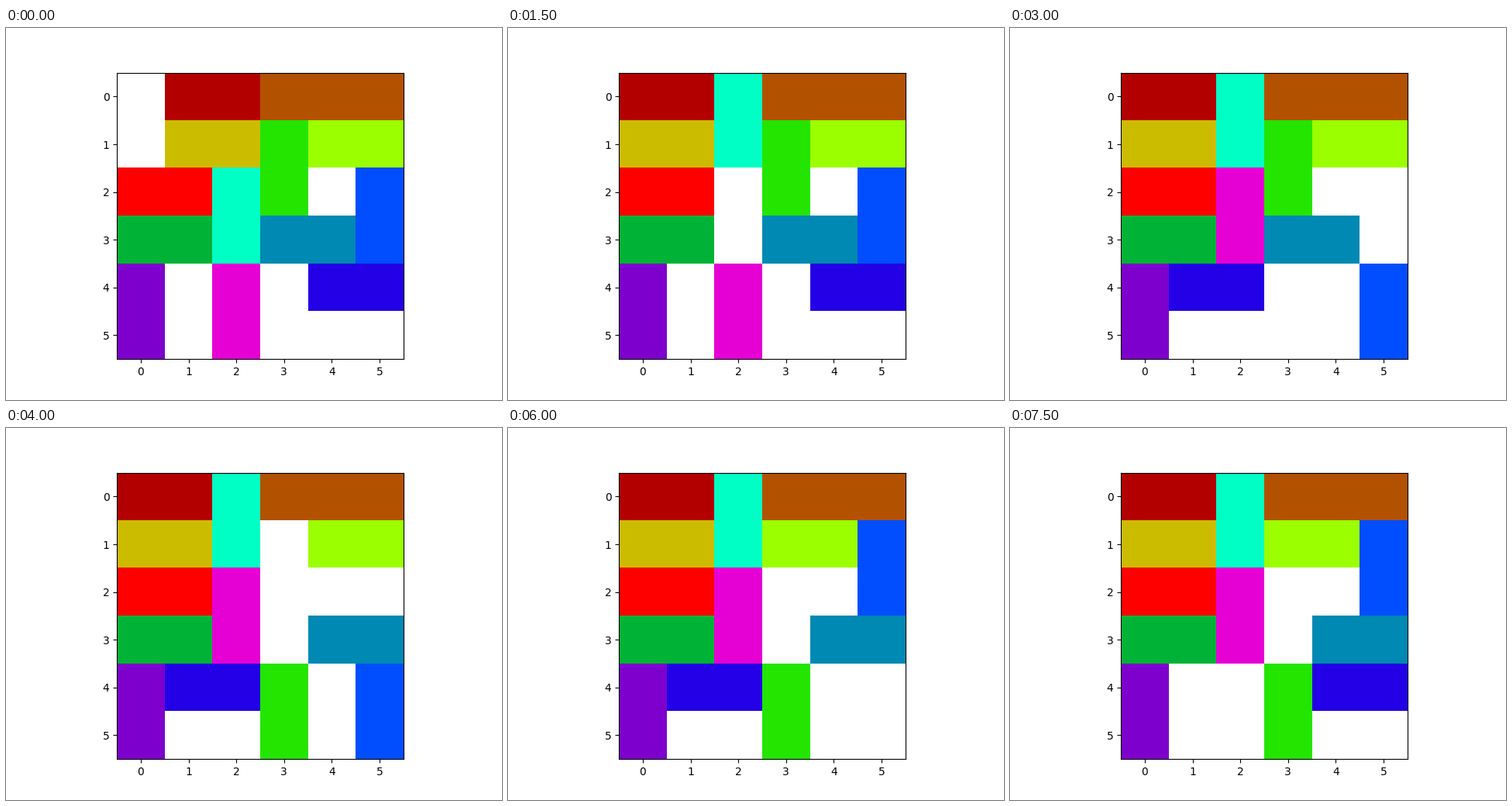
A matplotlib script for the animation above (8 s loop, 640 by 480 pixels).

```python
from colorsys import hls_to_rgb

import matplotlib.pyplot as plt
import numpy as np
from matplotlib.animation import FuncAnimation

SIZE = 6
STEP_MS = 500

# name: (row, col, length, vertical)
CARS = {
    "A": (0, 1, 2, False),
    "B": (0, 3, 3, False),
    "C": (1, 1, 2, False),
    "D": (1, 4, 2, False),
    "E": (1, 3, 2, True),
    "F": (3, 0, 2, False),
    "G": (2, 2, 2, True),
    "H": (3, 3, 2, False),
    "I": (2, 5, 2, True),
    "J": (4, 4, 2, False),
    "K": (4, 0, 2, True),
    "L": (4, 2, 2, True),
    "X": (2, 0, 2, False),
}

# (car, cells moved along its axis), one move per step
MOVES = [
    ("A", -1), ("C", -1), ("G", -2), ("L", -2), ("J", -3),
    ("I", 2), ("H", 1), ("E", 3), ("D", -1), ("H", -1),
    ("I", -3), ("H", 1), ("E", -2), ("J", 3), ("E", 2),
]

LIGHTNESS = [0.35, 0.35, 0.4, 0.5, 0.45, 0.35, 0.5, 0.35, 0.5, 0.45, 0.4, 0.45]
COLORS = {
    name: hls_to_rgb(k / 13, light, 1)
    for k, (name, light) in enumerate(zip("ABCDEFGHIJKL", LIGHTNESS))
}
COLORS["X"] = (1, 0, 0)


def board(step):
    """Return the RGB grid after the first `step` moves."""
    shift = dict.fromkeys(CARS, 0)
    for name, cells in MOVES[:step]:
        shift[name] += cells

    grid = np.ones((SIZE, SIZE, 3))
    for name, (row, col, length, vertical) in CARS.items():
        if vertical:
            row += shift[name]
            grid[row:row + length, col] = COLORS[name]
        else:
            col += shift[name]
            grid[row, col:col + length] = COLORS[name]
    return grid


fig, ax = plt.subplots(figsize=(6.4, 4.8), dpi=100)
image = ax.imshow(board(0), interpolation="nearest")


def update(step):
    image.set_data(board(step))
    return [image]


anim = FuncAnimation(fig, update, frames=len(MOVES) + 1, interval=STEP_MS,
                     repeat=True, repeat_delay=0)
plt.show()
```
